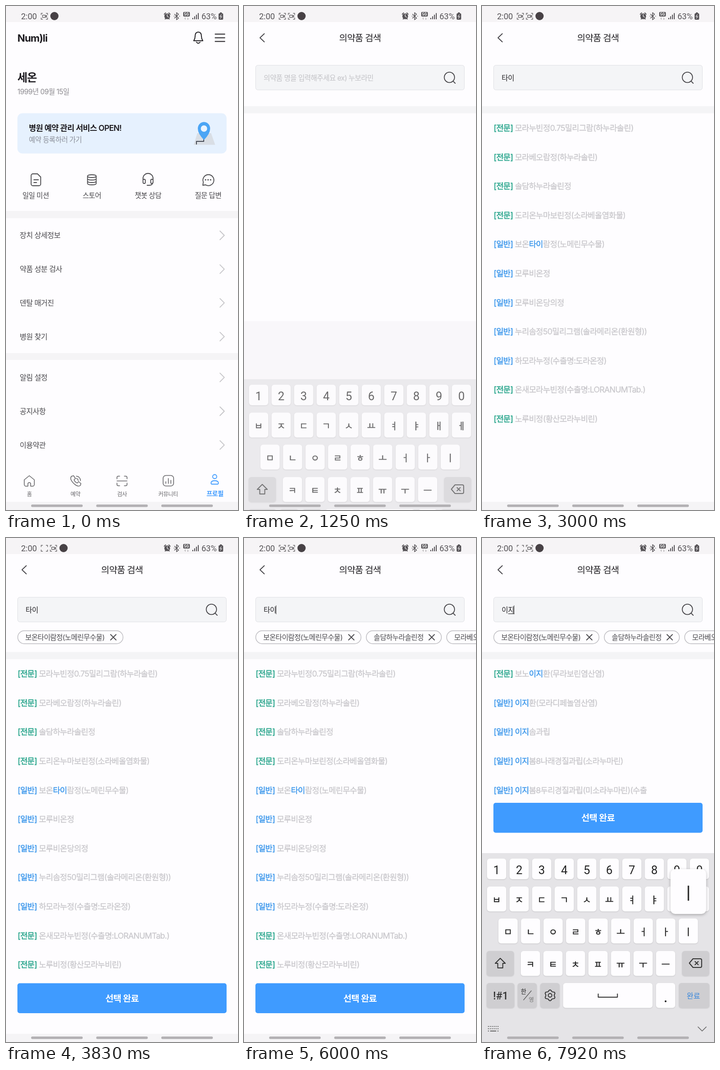
Animation of 508 by 1102 pixels, one loop 8000 ms. Source, as an HTML page:

```html
<!DOCTYPE html>
<html lang="ko">
<head>
<meta charset="utf-8">
<title>의약품 검색</title>
<style>
  html, body { margin: 0; width: 100%; height: 100%; overflow: hidden; background: #fefdff; }
  svg { display: block; width: 100vw; height: 100vh; }
  text { font-family: Inter, "Noto Sans CJK KR", "Noto Sans CJK", sans-serif; letter-spacing: -.04em; white-space: pre; stroke-linejoin: round; }
  .sys { font-family: Roboto, "Noto Sans CJK KR", "Noto Sans CJK", sans-serif; letter-spacing: 0; }
  .line { fill: none; stroke-linecap: round; stroke-linejoin: round; }
  .name { stroke: #c9c8cc; stroke-width: .35px; }
  .rx { fill: #2ba68d; stroke: #2ba68d; stroke-width: .6px; }
  .otc, .hit { fill: #459cec; stroke: #459cec; stroke-width: .6px; }
  .jamo { stroke: #222; stroke-width: .4px; }
  .key { filter: drop-shadow(0 1.5px 1px #0002); }
  #popup { filter: drop-shadow(0 2px 3px #0004); }
</style>
</head>
<body>
<svg id="stage" viewBox="0 0 508 1102"></svg>
<script>
const LOOP = 8000, FPS = 12;
const INK = '#4a494d', PAPER = '#fefdff', BAND = '#f5f4f6', BLUE = '#3f9bff';

// y is the vertical centre of the glyphs
const text = (x, y, str, size, { weight = 400, fill = INK, anchor = 'start', cls = '', id = '' } = {}) =>
  `<text id="${id}" class="${cls}" x="${x}" y="${y + size * .37}" font-size="${size}" font-weight="${weight}" fill="${fill}" text-anchor="${anchor}">${str}</text>`;
const mid = (x, y, str, size, opt = {}) => text(x, y, str, size, { anchor: 'middle', ...opt });
const rect = (x, y, w, h, fill, r = 0, extra = '') =>
  `<rect x="${x}" y="${y}" width="${w}" height="${h}" rx="${r}" fill="${fill}" ${extra}/>`;
const line = (d, stroke = INK, width = 1.8) =>
  `<path class="line" d="${d}" stroke="${stroke}" stroke-width="${width}"/>`;
const circle = (x, y, r, fill) => `<circle cx="${x}" cy="${y}" r="${r}" fill="${fill}"/>`;
const group = (id, body) => `<g id="${id}">${body}</g>`;

/* ---- status bar ---- */
const GREY = '#555256', SOFT = '#6b686b', BAR = '#f6f4f6';
const corners = x => line(`M${x} 19v-3h3M${x + 11} 16h3v3M${x + 14} 26v3h-3M${x + 3} 29h-3v-3`, SOFT, 1.4);
const camera = (x, id) => group(id, line(`M${x + 3} 20h6v5h-6zM${x + 9} 22l3-1.5v4l-3-1.5`, SOFT, 1.4));
const status = rect(0, 0, 508, 35, BAR) +
  text(33, 22.5, '2:00', 18, { cls: 'sys', fill: GREY }) +
  corners(77) + camera(77, 'firstCamera') +
  group('secondCapture', corners(97) + camera(97, 'secondCamera')) +
  group('badge', circle(106, 22, 9, '#474145')) +
  circle(353, 22.5, 6.3, GREY) + line('M353 18.5v4l3 2', BAR, 1.3) +
  line('M346.5 18l3-3M359.5 18l-3-3M348.5 28.5l1-1M357.5 28.5l-1-1', GREY) +
  line('M369 18l9 8.5-4.5 3.5V14.5l4.5 3.5-9 8.5M368 22.3h.4M380 22.3h.4', GREY, 1.5) +
  rect(388, 13, 14.5, 10, GREY, 2) + mid(395.2, 18.2, '5G', 8.5, { cls: 'sys', weight: 700, fill: '#fff' }) +
  line('M392.5 29.5v-4m-1.5 1.5l1.5-1.5M398 25.5v4m1.5-1.5l-1.5 1.5', '#a5a2a5', 1) +
  [0, 1, 2, 3].map(i => rect(408 + i * 4, 26 - i * 3.5, 2, 3 + i * 3.5, GREY)).join('') +
  text(428, 22.5, '63%', 18, { cls: 'sys', fill: GREY }) +
  rect(468.5, 14, 4, 3, GREY) + rect(465.5, 16, 10, 14, GREY, 2) + line('M471.5 19l-3 4h4l-3 4', BAR, 1.2);

/* ---- profile page ---- */
const menu = ['장치 상세정보', '약품 성분 검사', '덴탈 매거진', '병원 찾기', '알림 설정', '공지사항', '이용약관'];
const menuY = i => 501.5 + i * 73.8 + (i > 3 ? 15.5 : 0);
const shortcuts = [[65, '일일 미션'], [188, '스토어'], [311, '챗봇 상담'], [442.5, '질문 답변']];
const tabs = [[51, '홈'], [152, '예약'], [254, '검사'], [355, '커뮤니티']];
const TAB = '#67666a';
const home = rect(0, 0, 508, 1102, PAPER) +
  text(25, 70, 'Num)li', 22, { weight: 700, fill: '#1d1b20' }) +
  line('M411 76q3-4 3-9 0-10 7-10t7 10q0 5 3 9zM417 79q4 5 8 0', '#222024', 2) +
  line('M458 61.5h21M458 69.5h21M458 77.5h21', '#222024', 2) +
  text(25, 156, '세온', 24, { weight: 600, fill: '#1d1b20' }) +
  text(25, 187, '1999년 09월 15일', 15.5, { fill: '#8d8b90' }) +
  rect(25, 234.5, 458, 88, '#e6f1fe', 11) +
  text(50, 267, '병원 예약 관리 서비스 OPEN!', 17.4, { weight: 600, fill: '#1d1b20' }) +
  text(50, 292, '예약 등록하러 가기', 15.4, { fill: '#8b8f99' }) +
  '<path d="M419 278h30l9 25.500h-47z" fill="#d9dee5"/>' +
  line('M417 302v-6h16v-5', '#454a55', 2) +
  '<path d="M433.5 293q-13.5-14-13.5-25a13.5 14.5 0 0 1 27 0q0 11-13.5 25z" fill="#4ba5f5"/>' +
  circle(433.5, 268, 7, '#eaf4ff') +
  line('M59 367h10l7 7v15a4 4 0 0 1-4 4H59a4 4 0 0 1-4-4V371a4 4 0 0 1 4-4zM61 380h10M61 386h6') +
  line('M178.5 372c0-4 19-4 19 0s-19 4-19 0v16c0 4 19 4 19 0V372M178.5 377.5c0 4 19 4 19 0M178.5 383c0 4 19 4 19 0') +
  line('M300 381v-4a11 11 0 0 1 22 0v4M300 379h3q2 0 2 2v5q0 2-2 2h-1q-2 0-2-3zM322 379h-3q-2 0-2 2v5q0 2 2 2h1q2 0 2-3zM321 387q-1 5-7 5h-5') +
  line('M431 392l1-7a12 12 0 1 1 5 6z') + [437, 442.5, 448].map(x => circle(x, 380, 1.6, INK)).join('') +
  shortcuts.map(([x, s]) => mid(x, 414, s, 15.4)).join('') +
  rect(0, 448, 508, 16, BAND) + rect(0, 759, 508, 15, BAND) +
  menu.map((s, i) => text(30, menuY(i), s, 16.1) +
    line(`M468.5 ${menuY(i) - 9.5}l9.5 9.5-9.5 9.5`, '#c5c4c8')).join('') +
  line('M40 1036l11-9 11 9v10a4 4 0 0 1-4 4h-4v-5a3 3 0 0 0-6 0v5h-4a4 4 0 0 1-4-4z', TAB, 1.6) +
  line('M144 1028l4-1 4 6-3 3q2 5 7 7l3-3 5 4-1 4q-4 4-11-1t-10-12q-1-5 2-7zM154 1033q4 1 4 5M154 1028q9 1 9 10', TAB, 1.6) +
  line('M243 1034v-3q0-3 3-3h3M259 1028h3q3 0 3 3v3M265 1043v3q0 3-3 3h-3M249 1049h-3q-3 0-3-3v-3M243 1038.5h22', TAB, 1.6) +
  rect(344, 1026.5, 23, 23, 'none', 6, `stroke="${TAB}" stroke-width="1.6"`) +
  line('M350 1040v4M355.5 1033v11M361 1037v7', TAB, 1.6) +
  line('M452.5 1029a4.5 4.5 0 1 1 9 0 4.5 4.5 0 1 1-9 0M449 1043q0-5 8-5t8 5q0 2.500-2 2.500h-12q-2 0-2-2.500z', BLUE) +
  tabs.map(([x, s]) => mid(x, 1067, s, 12.2, { fill: TAB })).join('') +
  mid(457.5, 1066, '프로필', 14, { weight: 600, fill: BLUE });

/* ---- search page ---- */
const firstResults = [
  ['rx', '모라누빈정0.75밀리그람(하누라솔린)'], ['rx', '모라베오람정(하누라솔린)'], ['rx', '솔담하누라솔린정'],
  ['rx', '도리온누마보린정(소라베올염화물)'], ['otc', '보온타이람정(노메린무수물)'], ['otc', '모루비온정'],
  ['otc', '모루비온당의정'], ['otc', '누리솜정50밀리그램(솔라메리온(환원형))'], ['otc', '하모라누정(수출명:도라온정)'],
  ['rx', '온새모라누빈정(수출명:LORANUMTab.)'], ['rx', '노루비정(황산모라누비린)']];
const secondResults = [
  ['rx', '보노이지환(무라보린염산염)'], ['otc', '이지환(모라디페놀염산염)'], ['otc', '이지솜과립'],
  ['otc', '이지봄8나래경질과립(소라누마린)'], ['otc', '이지봄8두리경질과립(미소라누마린)(수출']];
const results = (id, rows, query) => group(id, rows.map(([kind, name], i) =>
  text(25.5, 266.5 + i * 63.6, `<tspan class="${kind}">[${kind === 'rx' ? '전문' : '일반'}]</tspan> ` +
    name.replace(query, `<tspan class="hit">${query}</tspan>`), 17.5, { cls: 'name', fill: '#c9c8cc' })).join(''));

const chip = (id, x, w, name) => group(id,
  rect(x + .75, 202.75, w - 1.5, 28.5, PAPER, 14.3, 'stroke="#bdbcc1" stroke-width="1.5"') +
  text(x + 17, 217, name, 15.5) +
  line(`M${x + w - 28} 211l12 12m0-12l-12 12`));

const search = rect(0, 0, 508, 1102, PAPER) +
  line('M44.5 60.5l-9.5 9 9.5 9', '#444247') +
  mid(254, 69.5, '의약품 검색', 19.8, { weight: 500, fill: '#222024' }) +
  rect(25.5, 129.5, 457, 54, '#f4f5f7', 5, 'stroke="#dfe0e4"') +
  line('M438.5 156a11.3 11.3 0 1 1 22.6 0 11.3 11.3 0 1 1-22.6 0M458 164.5l4.5 4.5') +
  text(43, 157, '의약품 명을 입력해주세요 ex) 누보라민', 15.5, { fill: '#c2c2c6', id: 'hint' }) +
  text(43, 157, '', 15.5, { fill: '#222024', id: 'typed' }) +
  group('caret', rect(0, 147.5, 1, 19, '#333')) + group('under', rect(-13, 165, 13, 1.2, '#333')) +
  group('chips', chip('chip0', 25, 232, '보온타이람정(노메린무수물)') +
    chip('chip1', 267, 166, '솔담하누라솔린정') + chip('chip2', 443, 218, '모라베오람정(하누라솔린)')) +
  group('body', rect(0, 219, 508, 15.5, '#f4f4f6') +
    results('list1', firstResults, '타이') + results('list2', secondResults, '이지')) +
  group('done', rect(0, 968, 508, 140, PAPER) + rect(25, 973.5, 458, 65.5, BLUE, 5) +
    mid(254, 1006.5, '선택 완료', 19.6, { weight: 600, fill: '#fff' }));

/* ---- keyboard ---- */
const PITCH = 49.35, WHITE = '#fefdff', DARK = '#cfced1';
const key = (x, y, w, h, fill = WHITE, id = '') => rect(x, y, w, h, fill, 6, `class="key" id="${id}"`);
const rows = [['1234567890', 11, 701, 45], ['ㅂㅈㄷㄱㅅㅛㅕㅑㅐㅔ', 11, 762, 54.5],
  ['ㅁㄴㅇㄹㅎㅗㅓㅏㅣ', 36, 832, 54.5], ['ㅋㅌㅊㅍㅠㅜㅡ', 85, 903, 54.5]];
const keyPos = {};
const letters = rows.map(([chars, x0, y, h], r) => [...chars].map((c, i) => {
  const x = x0 + i * PITCH;
  keyPos[c] = [x + 21, y];
  return key(x, y, 42, h) + mid(x + 21, y + h / 2 + 2, c, r ? 20.5 : 25.5, { cls: r ? 'sys jamo' : 'sys', fill: '#222' });
}).join('')).join('');
const gear = Array.from({ length: 33 }, (_, i) => {
  const a = i / 32 * Math.PI * 2, r = 10.5 + 1.5 * Math.cos(a * 6);
  return `${i ? 'L' : 'M'}${149 + r * Math.sin(a)} ${1000 - r * Math.cos(a)}`;
}).join('');
const dots = [0, 1, 2].map(r => [0, 1, 2, 3, 4, 5].map(i =>
  r === 2 && i > 0 && i < 5 ? '' : rect(13 + i * 4.2, 1067 + r * 5, 2, 2, '#666')).join('')).join('');
const keyboard = rect(0, 689, 508, 820, '#e5e4e7') + letters +
  key(10, 903, 60, 54.5, DARK) + line('M40 919l11 11h-5.5v10h-11v-10H29z', '#333', 2) +
  key(438, 903, 59.5, 54.5, DARK, 'erase') + line('M462 920h16q3 0 3 3v13q0 3-3 3h-16l-8-9.5zM466.5 926l7 7m0-7l-7 7', '#333', 2) +
  key(10, 973, 61, 54.5, DARK) + mid(41, 1000, '!#1', 23, { cls: 'sys', weight: 500, fill: '#333' }) +
  key(78, 973, 42, 54.5, DARK) + mid(91, 991, '한', 13, { cls: 'sys', fill: '#222' }) +
  mid(108, 1009, '영', 12.5, { cls: 'sys', fill: '#777' }) + line('M91 1010l17-20', '#555', 1.2) +
  key(127.5, 973, 42.5, 54.5, DARK) + line(gear, '#333', 1.9) + line('M145 1000a4 4 0 1 1 8 0 4 4 0 1 1-8 0', '#333', 1.9) +
  key(177.5, 973, 196, 54.5) + line('M254.5 997v7h42v-7', '#333', 2) +
  key(381, 973, 42, 54.5) + circle(402, 1013, 2, '#222') +
  key(431, 973, 67, 54.5, DARK) + mid(463, 1001, '완료', 16, { cls: 'sys', fill: '#3585db' }) +
  dots + line('M18.5 1078h12', '#666', 2) + line('M473 1069l9 9 9-9', '#666', 1.6);

const pills = [55, 197.5, 340].map(x => rect(x, 1090, 113, 5.5, '#b3b1b4', 2.7)).join('');
document.getElementById('stage').innerHTML = group('home', home) + group('search', search) +
  rect(0, 1084, 508, 18, BAND) + group('shade', rect(0, 689, 508, 413, '#f9f7fa')) +
  group('keyboard', keyboard) +
  group('popup', rect(-39, -108, 78, 98, WHITE, 10) + mid(0, -55, '', 37, { cls: 'sys', fill: '#222', id: 'popupChar' })) +
  pills + status;

/* ---- timeline, in twelfths of a second ---- */
const el = id => document.getElementById(id);
const show = (id, on) => { el(id).style.display = on ? '' : 'none'; };
const move = (id, x, y) => el(id).setAttribute('transform', `translate(${x} ${y})`);
const clamp = v => Math.min(1, Math.max(0, v));
const smooth = v => (v = clamp(v)) * v * (3 - 2 * v);
// last entry whose start has been reached
const at = (list, f) => list.reduce((value, [start, v]) => f >= start ? v : value, '');

const typing = [[21, 'ㅌ'], [22, '타'], [24, '탕'], [25, '타이'], [79, '타'], [80, ''], [90, 'ㅇ'], [92, '이'], [94, '잊'], [95, '이지']];
const presses = [[21, 'ㅌ'], [22, 'ㅏ'], [23, ''], [24, 'ㅇ'], [25, 'ㅣ'], [26, ''], [90, 'ㅇ'], [91, ''], [92, 'ㅣ'], [93, ''], [94, 'ㅈ'], [95, 'ㅣ']];
const rise = f => f < 32 ? clamp((f - 13) / 3) : f < 70 ? clamp((35 - f) / 3) : clamp((f - 73) / 3);

function draw(f) {
  const ms = f * 1000 / FPS + .01;

  show('firstCamera', Math.floor(ms / 500) % 2 === 0);
  const slide = clamp(f / 2);
  el('secondCapture').style.opacity = slide;
  move('badge', 20 * slide, 0);

  const enter = clamp((f - 3) / 3);
  show('search', enter > 0);
  el('search').style.opacity = enter;

  const up = rise(f);
  show('keyboard', up > 0);
  show('shade', up > 0 && up < 1);
  move('keyboard', 0, 381 * (1 - up));
  el('keyboard').style.opacity = up;
  el('erase').setAttribute('fill', f >= 78 && f < 84 ? '#a8a7aa' : DARK);

  const word = at(typing, f), end = 43 + word.length * 13.65;
  el('typed').textContent = word;
  show('hint', !word);
  const composing = (f >= 21 && f < 32) || f >= 90;
  const blink = Math.floor((ms - 3830) / 550) & 1;
  show('caret', word && (composing || f >= 74 || blink));
  show('under', word && composing);
  move('caret', end - .5, 0);
  move('under', end, 0);

  const pressed = at(presses, f);
  show('popup', pressed);
  if (pressed) {
    move('popup', ...keyPos[pressed]);
    el('popupChar').textContent = pressed;
  }

  const picked = f >= 41;
  [41, 47, 53].forEach((start, i) => show('chip' + i, f >= start));
  move('chips', -178 * (smooth((f - 58) / 8) - smooth((f - 67) / 5)), 0);
  move('body', 0, picked ? 30.3 : 0);
  show('list1', f >= 29 && f < 80);
  show('list2', f >= 95);
  show('done', picked);
  move('done', 0, f >= 74 ? -394.5 : 0);
}

const began = performance.now();
function tick() {
  const t = (performance.now() - began) % LOOP;
  draw(Math.min(95, Math.floor((t + 5) * FPS / 1000)));
  requestAnimationFrame(tick);
}
tick();
</script>
</body>
</html>
```
